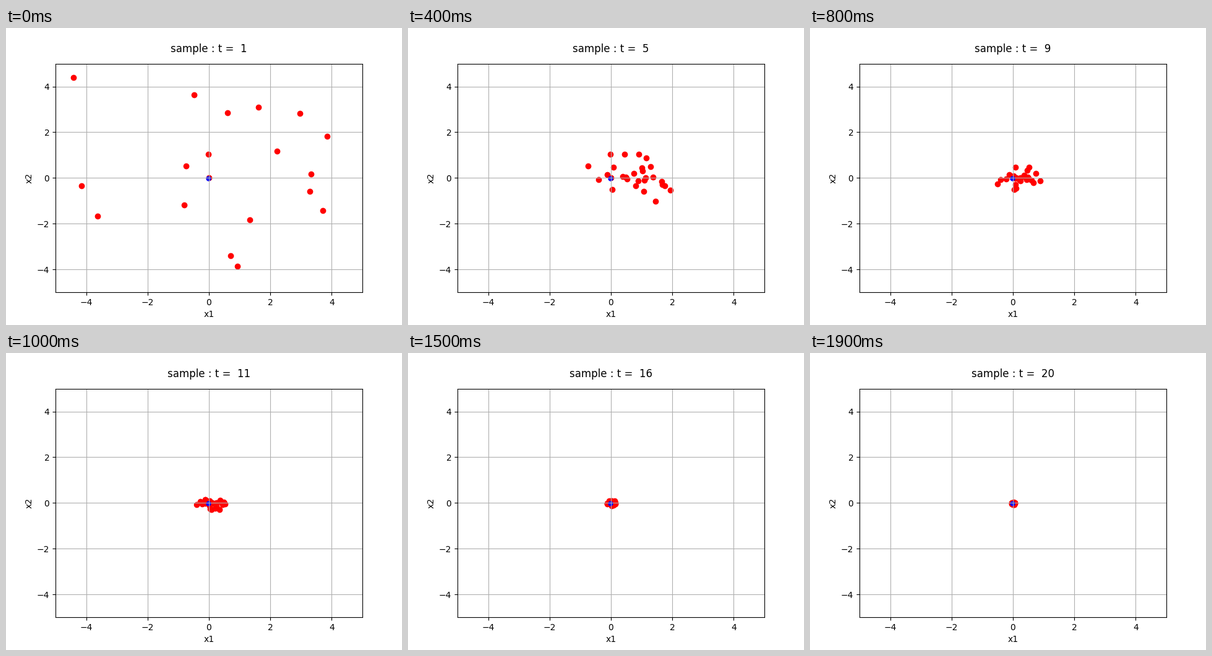
Write a matplotlib script that moves like this. It is 640 px wide and 480 px high and loops after 2 s.

```python
import numpy as np
import matplotlib.pyplot as plt
from matplotlib.animation import FuncAnimation

FRAMES, INTERVAL = 20, 100
BEST = (-0.03, -0.02)
OUTSIDE = 9  # candidates that begin beyond the visible range

# Where the visible candidates begin; all later places follow from the search.
start = [
    (0.01, 0), (-4.41, 4.39), (-0.48, 3.64), (0.60, 2.85), (1.61, 3.10),
    (2.96, 2.82), (3.85, 1.82), (2.22, 1.17), (-0.02, 1.04), (-0.74, 0.52),
    (-4.15, -0.34), (-3.63, -1.67), (-0.81, -1.18), (3.33, 0.16),
    (3.29, -0.59), (3.71, -1.43), (1.33, -1.83), (0.71, -3.40),
    (0.93, -3.86)]


def region(k):
    """Centre and half axes of the shrinking search ellipse at step k."""
    reach = 5 * np.exp(-0.23 * k)
    done = k / (FRAMES - 1)
    centre = np.array([0.01 + 0.3 * reach * (1 - done), -0.02 * done])
    return centre, reach * np.array([1, 0.5 + 0.5 * done])


def search():
    """Candidates hold still until the ellipse leaves them, then jump into it."""
    rng = np.random.default_rng(7)
    pos = np.vstack([start, np.full((OUTSIDE, 2), 9.0)])
    track = [pos]
    for k in range(1, FRAMES):
        centre, axes = region(k)
        angle = rng.uniform(0, 2 * np.pi, len(pos))
        radius = rng.uniform(0, 1, len(pos))
        unit = np.column_stack([np.cos(angle), np.sin(angle)])
        trial = centre + axes * unit * radius[:, None]
        left = np.hypot(*((pos - centre) / axes).T) > 1
        pos = np.where(left[:, None], trial, pos)
        track.append(pos)
    return track


track = search()

fig, ax = plt.subplots(figsize=(6.4, 4.8), dpi=100)
ax.set(xlim=(-5, 5), ylim=(-5, 5), xlabel="x1", ylabel="x2")
ax.grid(True)
swarm = ax.scatter([], [], c="red")
ax.scatter(*BEST, c="blue", s=25)
title = ax.text(0.5, 1.05, "", ha="center", fontsize="large",
                transform=ax.transAxes)


def update(k):
    swarm.set_offsets(track[k])
    title.set_text(f"sample : t =  {k + 1}")
    return swarm, title


anim = FuncAnimation(fig, update, frames=FRAMES, interval=INTERVAL,
                     repeat=True, repeat_delay=0)
plt.show()
```
